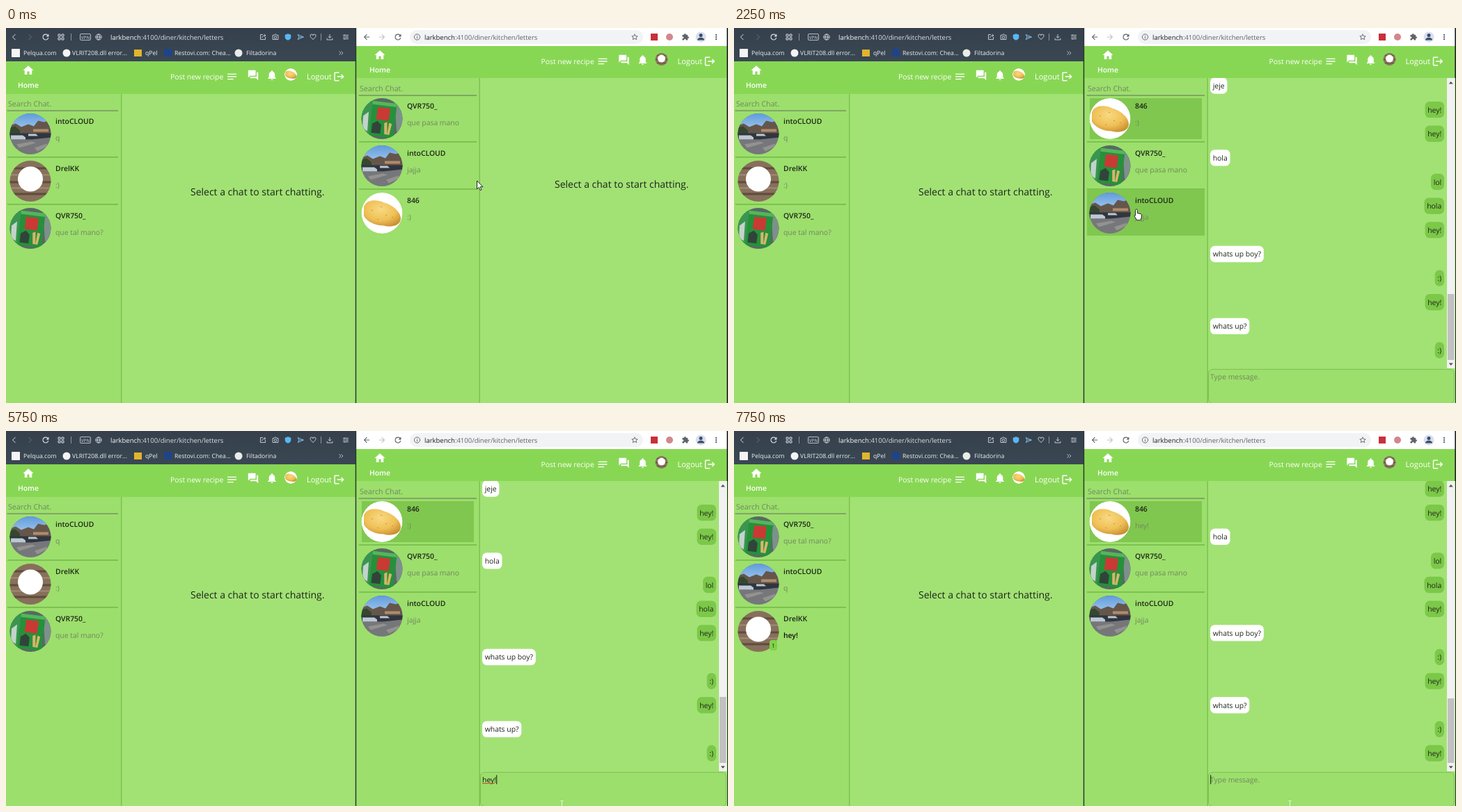
Write an HTML page that moves like this. It is 1037 px wide and 540 px high and loops after 8000 ms.

```html
<!DOCTYPE html>
<html lang="en">
<head>
<meta charset="utf-8">
<title>Recipe chat</title>
<style>
  html, body { margin: 0; width: 100%; height: 100%; overflow: hidden; background: #9cdf6b; }
  svg { display: block; width: 1037px; height: 540px; }
  text { font-family: "Open Sans", "Noto Sans", sans-serif; white-space: pre; text-rendering: geometricPrecision; }
</style>
</head>
<body>
<svg id="stage" viewBox="0 0 1037 540">
  <defs>
    <clipPath id="disc"><circle r="29.5"/></clipPath>
    <clipPath id="pane"><rect x="681" y="72" width="343" height="418"/></clipPath>
    <linearGradient id="bar" x2="0" y2="1">
      <stop stop-color="#35404c"/><stop offset="1" stop-color="#3a4753"/>
    </linearGradient>
    <linearGradient id="sky" x2="0" y2="1">
      <stop stop-color="#5f9bdc"/><stop offset="1" stop-color="#a9cdee"/>
    </linearGradient>
    <radialGradient id="skin" cx=".45" cy=".35" r=".7">
      <stop stop-color="#f8d982"/><stop offset=".6" stop-color="#efc056"/><stop offset="1" stop-color="#c98f33"/>
    </radialGradient>
    <g id="street" clip-path="url(#disc)">
      <rect x="-30" y="-30" width="60" height="60" fill="#75777b"/>
      <rect x="-30" y="-30" width="60" height="28" fill="url(#sky)"/>
      <path d="M-30-12l9-3 8 5 10-4 8 3 6-8 9 2 10-4v22h-60z" fill="#65564b"/>
      <path d="M-30-9l8-2 7 6v6h-15z" fill="#34482f"/>
      <path d="M4-7h22v4H4z" fill="#b08b6c"/>
      <path d="M-30-1h60v6l-28 3h-32z" fill="#30363f"/>
      <path d="M-28 2h17l4 3v3h-21zM-3 0h11l3 3H-3z" fill="#bcc8d2"/>
      <path d="M-20 15l22-4 6 2-24 7zM6 20l18-6v4l-14 7z" fill="#94928f"/>
    </g>
    <g id="snack" clip-path="url(#disc)">
      <rect x="-30" y="-30" width="60" height="60" fill="#566a63"/>
      <path d="M-30-30h18l-6 60h-12z" fill="#3a9550"/>
      <path d="M-27-4l8-6-2 28-7-4z" fill="#c3d3cb"/>
      <path d="M18-24l12 4v44l-9-6z" fill="#7e908a"/>
      <g transform="rotate(7)">
        <rect x="-16" y="-24" width="35" height="50" fill="#25913a"/>
        <rect x="-16" y="-24" width="35" height="5" fill="#57b45c"/>
        <rect x="-8" y="-16" width="18" height="18" fill="#c93a35"/>
        <path d="M-13 9l7-5 6 5v13h-13z" fill="#31443a"/>
        <path d="M4 6l4-2 2 18H6zM11 5l4 1-2 16h-3z" fill="#d8b56b"/>
      </g>
    </g>
    <g id="wood" clip-path="url(#disc)">
      <rect x="-30" y="-30" width="60" height="60" fill="#87705b"/>
      <path d="M-30-20h60v3h-60zM-30 0h60v3h-60zM-30 17h60v3h-60z" fill="#5f4c3c"/>
      <path d="M-30-10h60v2h-60zM-30 9h60v2h-60z" fill="#a38a72"/>
      <circle cy="-3" r="18" fill="#fff"/>
    </g>
    <g id="potato" clip-path="url(#disc)">
      <circle r="29.5" fill="#fff"/>
      <path d="M-26-9C-22-20-8-20 3-15C15-12 27-2 27 8C26 19 13 21 2 18C-10 18-22 12-26 4z" fill="url(#skin)"/>
      <path d="M-15-4h2M-2-9h2M5 3h2M14 6h2M-7 9h2" stroke="#c79338" stroke-width="1.2"/>
    </g>
  </defs>
  <g id="fixed"></g>
  <g id="live"></g>
</svg>
<script>
const LOOP = 8000;
const GREEN = { head: '#88d754', side: '#9cdf6c', main: '#a2e275', line: '#7cc250', deep: '#80c74f', mine: '#7cc849' };
const GREY = '#71875f', INK = '#1d2418';
const BODY = 10.4;

const ICONS = {
  home: 'M10 20v-6h4v6h5v-8h3L12 3 2 12h3v8z',
  forum: 'M21 6h-2v9H6v2c0 .55.45 1 1 1h11l4 4V7c0-.55-.45-1-1-1zm-4 6V3c0-.55-.45-1-1-1H3c-.55 0-1 .45-1 1v14l4-4h10c.55 0 1-.45 1-1z',
  bell: 'M12 22c1.1 0 2-.9 2-2h-4c0 1.1.89 2 2 2zm6-6v-5c0-3.07-1.64-5.64-4.5-6.32V4c0-.83-.67-1.5-1.5-1.5s-1.5.67-1.5 1.5v.68C7.63 5.36 6 7.92 6 11v5l-2 2v1h16v-1z',
  exit: 'M17 7l-1.41 1.41L18.17 11H8v2h10.17l-2.58 2.58L17 17l5-5zM4 5h8V3H4c-1.1 0-2 .9-2 2v14c0 1.1.9 2 2 2h8v-2H4z',
  notes: 'M3 18h12v-2H3zM3 6v2h18V6zm0 7h18v-2H3z',
  reload: 'M17.65 6.35C16.2 4.9 14.2 4 12 4a8 8 0 1 0 7.73 10h-2.08A6 6 0 1 1 16.2 7.8L13 11h7V4z',
  back: 'M20 11H7.83l5.59-5.59L12 4l-8 8 8 8 1.41-1.41L7.83 13H20z',
  puzzle: 'M20.5 11H19V7c0-1.1-.9-2-2-2h-4V3.5a2.5 2.5 0 0 0-5 0V5H4c-1.1 0-2 .9-2 2v3.8h1.5a2.7 2.7 0 0 1 0 5.4H2V20c0 1.1.9 2 2 2h3.8v-1.5a2.7 2.7 0 0 1 5.4 0V22H17c1.1 0 2-.9 2-2v-4h1.5a2.5 2.5 0 0 0 0-5z',
  shield: 'M12 2l9 3v7c0 5-4 8.500-9 10-5-1.500-9-5-9-10V5z',
  dots: 'M10 4h4v4h-4zM10 10h4v4h-4zM10 16h4v4h-4z'
};
const OUTLINES = {
  chevron: 'M15 4l-8 8 8 8',
  grid: 'M4 4h6v6H4zM14 4h6v6h-6zM4 14h6v6H4zM14 14h6v6h-6z',
  globe: 'M21 12a9 9 0 1 1-18 0 9 9 0 0 1 18 0zM3 12h18M12 3c-5 5-5 13 0 18 5-5 5-13 0-18',
  edit: 'M12 4H4v16h16v-8M9 15c1-6 4-8 11-8M16 3l5 4-5 4',
  camera: 'M3 6h5l2-3h4l2 3h5v14H3zM16 13a4 4 0 1 1-8 0 4 4 0 0 1 8 0z',
  send: 'M3 4l19 8-19 8 4-8zM7 12h14',
  heart: 'M12 20C5 14 3 11 3 8a4.5 4.5 0 0 1 9-1 4.5 4.5 0 0 1 9 1c0 3-2 6-9 12z',
  load: 'M12 3v12M7 10l5 5 5-5M3 16v5h18v-5',
  sliders: 'M3 6h18M3 12h18M3 18h18M8 4v4M16 10v4M9 16v4',
  info: 'M21 12a9 9 0 1 1-18 0 9 9 0 0 1 18 0zM12 11v6M12 7v2',
  star: 'M12 3l2.7 6 6.300.6-4.800 4.200 1.500 6.200-5.700-3.400-5.700 3.400 1.500-6.200L3 9.600l6.300-.6z',
  more: 'M5 5l7 7-7 7M13 5l7 7-7 7'
};
const CURSORS = {
  arrow: ['M.5.5v12l2.800-2.600 1.900 4.300 1.900-.8-1.900-4.200h3.800z', '#fff', '#111'],
  hand: ['M4 .5c1 0 1.400.7 1.400 1.500v4.200l4.600.9c1.200.3 1.700 1 1.600 2.200l-.6 3.700-1.300 3.200H4.700L1.100 10.500c-.6-.9.400-1.800 1.500-1V2C2.600 1.100 3.100.5 4 .5z', '#fff', '#111'],
  beam: ['M-2 .5h1.500l.5.5.5-.5H2M0 1v9', 'none', '#f4fbea']
};

const pen = document.createElement('canvas').getContext('2d');
pen.font = `${BODY}px "Open Sans", "Noto Sans", sans-serif`;
const widthOf = s => pen.measureText(s).width;

const rect = (x, y, w, h, fill, extra = '') =>
  `<rect x="${x}" y="${y}" width="${w}" height="${h}" fill="${fill}" ${extra}/>`;
const circle = (x, y, r, fill) => `<circle cx="${x}" cy="${y}" r="${r}" fill="${fill}"/>`;
const text = (x, y, s, fill = INK, size = BODY, weight = 400, anchor = 'start') =>
  `<text x="${x}" y="${y}" fill="${fill}" font-size="${size}" font-weight="${weight}" text-anchor="${anchor}">${s}</text>`;
const place = (x, y, k, inner) => `<g transform="translate(${x} ${y}) scale(${k})">${inner}</g>`;
// Icons sit on a 24-unit grid and are placed by their centre.
const icon = (name, x, y, k, fill = '#fff') =>
  place(x - 12 * k, y - 12 * k, k, `<path d="${ICONS[name]}" fill="${fill}"/>`);
const outline = (name, x, y, k, color, weight = 2) =>
  place(x - 12 * k, y - 12 * k, k, `<path d="${OUTLINES[name]}" fill="none" stroke="${color}" stroke-width="${weight}"/>`);
const avatar = (id, x, y, r = 29.5) => place(x, y, r / 29.5, `<use href="#${id}"/>`);

const HOST = 'larkbench', PATH = ':4100/diner/kitchen/letters';
const address = (x, hostColor, pathColor) =>
  text(x, 17, `${HOST}<tspan fill="${pathColor}">${PATH}</tspan>`, hostColor, 9.5);

function darkBrowser() {
  const c = '#d5dbe0';
  const tools = [['edit', 369], ['camera', 387], ['send', 423], ['heart', 441], ['load', 465], ['sliders', 488]];
  const marks = [[25, 'Pelqua.com'], [95, 'VLRIT208.dll error...'], [200, 'qPel'], [242, 'Restovi.com: Chea...'], [345, 'Filtadorina']];
  return rect(0, 0, 502, 48, 'url(#bar)')
    + outline('chevron', 12, 13, .5, c) + `<g transform="rotate(180 34 13)">${outline('chevron', 34, 13, .5, '#65717c')}</g>`
    + icon('reload', 57, 13, .56, c) + outline('grid', 79, 13, .5, c)
    + rect(93, 8, 1, 10, '#8b959d') + rect(452, 8, 1, 10, '#8b959d')
    + rect(106.5, 8.5, 15, 9, 'none', `rx="1.500" stroke="${c}" stroke-width=".8"`) + text(114, 15.5, 'VPN', c, 6.3, 400, 'middle')
    + outline('globe', 133, 13, .46, c) + address(150, '#f5f7f8', '#d9dee2')
    + tools.map(([n, x]) => outline(n, x, 13, .44, n === 'send' ? '#8cc8f0' : c)).join('')
    + icon('shield', 405, 13, .48, '#58b7f3')
    + rect(8, 30, 12, 12, '#f4f4f4') + circle(87, 36, 5.5, '#f4f4f4') + rect(184, 31, 11, 10, '#e2b52c')
    + rect(227, 30, 11, 11, '#1e4488') + circle(334, 36, 5.5, '#e9ece8')
    + marks.map(([x, s]) => text(x, 39, s, '#eef1f3', 8.7)).join('')
    + outline('more', 481, 36, .38, c);
}

function lightBrowser() {
  const c = '#5f6368';
  return rect(503, 0, 533, 26, '#fff') + rect(580, 3, 335, 20, '#f1f3f4', 'rx="10"')
    + icon('back', 518, 13, .52, c) + `<g transform="rotate(180 540 13)">${icon('back', 540, 13, .52, '#bfc2c5')}</g>`
    + icon('reload', 563, 13, .56, c) + outline('info', 590.5, 13, .46, c)
    + address(601, '#202124', c) + outline('star', 903, 13, .46, c)
    + rect(926, 8, 10, 10, '#c8303a') + circle(953, 13, 5, '#d4868c')
    + icon('puzzle', 976, 13, .46, c)
    + circle(998, 13, 7.5, '#d9e0ec') + circle(998, 10.5, 2.5, '#3c4d70') + '<path d="M993 17.500c0-5 10-5 10 0z" fill="#3c4d70"/>'
    + icon('dots', 1020, 13, .5, c);
}

// dx moves the home link, ex the group at the right end.
function header(dx, ex, y, face) {
  return icon('home', 32 + dx, y + 13, .75) + text(32 + dx, y + 38, 'Home', '#fff', BODY, 600, 'middle')
    + text(236 + ex, y + 26, 'Post new recipe', '#fff') + icon('notes', 324.5 + ex, y + 22, .72)
    + icon('forum', 355 + ex, y + 20, .72) + icon('bell', 382 + ex, y + 20, .72)
    + avatar(face, 409 + ex, y + 19, 9)
    + text(432 + ex, y + 26, 'Logout', '#fff', 11) + icon('exit', 478.5 + ex, y + 22, .72);
}

function fixedParts() {
  return rect(0, 48, 502, 492, GREEN.side) + rect(166, 95, 336, 445, GREEN.main)
    + rect(0, 48, 502, 47, GREEN.head) + rect(165, 95, 1.5, 445, GREEN.line)
    + darkBrowser() + header(0, 0, 48, 'potato')
    + text(265, 241, 'Select a chat to start chatting.', INK, 14)
    + rect(503, 26, 533, 514, GREEN.side) + rect(681, 72, 355, 468, GREEN.main)
    + rect(503, 26, 533, 46, GREEN.head) + rect(679.5, 72, 1.5, 468, GREEN.line)
    + lightBrowser() + header(505, 532.5, 26, 'wood')
    + rect(501.7, 0, 1.5, 540, '#2c3830') + rect(1035.3, 0, 1.7, 540, '#23282a');
}

const street = msg => ({ face: 'street', name: 'intoCLOUD', msg });
const snack = msg => ({ face: 'snack', name: 'QVR750_', msg });
const wood = (msg, unread) => ({ face: 'wood', name: 'DrelKK', msg, unread });
const potato = msg => ({ face: 'potato', name: '846', msg });

function chatList(x, y, w, items, { active, hover } = {}) {
  let out = text(x + 1, y - 6, 'Search Chat.', GREY, 10.7) + rect(x - .5, y - .5, w + .5, 1.2, '#6f8263');
  if (hover) out += rect(x, y + 135, w, 67, GREEN.deep);
  if (active) out += rect(x + 4, y + 4, w - 8, 59, GREEN.deep);
  items.forEach(({ face, name, msg, unread }, i) => {
    const top = y + 68 * i;
    out += avatar(face, x + 33, top + 33.5) + text(x + 69, top + 19, name, INK, BODY, 600)
      + text(x + 69, top + 43, msg, unread ? '#111' : GREY, BODY, unread ? 600 : 400);
    if (unread) out += rect(x + 49, top + 46, 11, 15, '#7fd24a', 'rx="4"') + text(x + 54.5, top + 57, '1', INK, 8, 400, 'middle');
    if (i < items.length - 1) out += rect(x, top + 66, w, 2, GREEN.line);
  });
  return out;
}

// A leading ">" marks the user's own messages.
const LOG = ['jeje', '>hey!', '>hey!', 'hola', '>lol', '>hola', '>hey!', 'whats up boy?', '>:)', '>hey!', 'whats up?', '>:)', '>hey!'];

function bubble(line, i) {
  const mine = line[0] === '>', s = mine ? line.slice(1) : line;
  const w = widthOf(s) + 7.5, x = mine ? 1020 - w : 684, y = 83 + 34.64 * i;
  return rect(x, y - 11.7, w, 23.4, mine ? GREEN.mine : '#fff', 'rx="6.500"') + text(x + 3.7, y + 4, s);
}

function chatPane({ sent, typed, caret, squiggle }) {
  const end = 684 + widthOf(typed), thumb = sent ? 385 : 383;
  let out = rect(681, 72, 355, 468, GREEN.main)
    + `<g clip-path="url(#pane)">${LOG.slice(sent, sent + 12).map(bubble).join('')}</g>`
    + rect(1024, 72, 11.3, 418, '#f1f1f1') + rect(1025, thumb, 9.3, 478 - thumb, '#c1c1c1')
    + '<path d="M1026.700 80.500l3-3.500 3 3.500zM1026.700 482.500l3 3.500 3-3.500z" fill="#505050"/>'
    + rect(681.5, 491.5, 353, 49, GREEN.side, `rx="6" stroke="#6fb044" stroke-dasharray="1.500 .7"`)
    + (typed ? text(684, 506, typed, '#111') : text(684, 506, 'Type message.', GREY));
  if (squiggle) out += `<path d="M684 508${'l1-1 1 1'.repeat(9)}" fill="none" stroke="#d8342c" stroke-width=".9"/>`;
  if (caret) out += rect(end + .2, 495.5, 1, 13, '#111');
  return out;
}

function cursor([kind, x, y]) {
  const [d, fill, stroke] = CURSORS[kind];
  return place(x, y, 1, `<path d="${d}" fill="${fill}" stroke="${stroke}" stroke-width=".9" stroke-linejoin="round"/>`);
}

const STEPS = [
  [0, { cur: ['arrow', 676, 219.5], open: 0, hover: 0, sent: 0, typed: '', caret: 0, squiggle: 0 }],
  [250, { cur: ['arrow', 680, 268] }],
  [500, { cur: ['arrow', 688, 295] }],
  [750, { cur: ['arrow', 688, 296] }],
  [1000, { cur: ['arrow', 686, 296] }],
  [1250, { cur: ['hand', 587, 262], hover: 1 }],
  [1500, { cur: ['hand', 574, 260.5] }],
  [2250, { open: 1 }],
  [2500, { cur: ['hand', 584, 265] }],
  [2750, { cur: ['beam', 798.5, 530], hover: 0 }],
  [3250, { cur: ['beam', 798.5, 532] }],
  [3500, { caret: 1 }],
  [4000, { caret: 0 }],
  [4250, { typed: 'hey', caret: 1 }],
  [5000, { caret: 0 }],
  [5500, { caret: 1, squiggle: 1 }],
  [5750, { typed: 'hey!' }],
  [6250, { sent: 1, typed: '', caret: 0, squiggle: 0 }],
  [6750, { caret: 1 }],
  [7250, { caret: 0 }],
  [7750, { caret: 1 }]
];

function scene(s) {
  const left = s.sent
    ? [snack('que tal mano?'), street('q'), wood('hey!', true)]
    : [street('q'), wood(':)'), snack('que tal mano?')];
  const rest = [snack('que pasa mano'), street('jajja')];
  const mine = potato(s.sent ? 'hey!' : ':)');
  const right = s.open ? [mine, ...rest] : [...rest, mine];
  return chatList(2, 119, 159, left)
    + chatList(507, 97, 169, right, { active: s.open, hover: s.hover })
    + (s.open ? chatPane(s) : text(788, 230, 'Select a chat to start chatting.', INK, 14))
    + cursor(s.cur);
}

document.getElementById('fixed').innerHTML = fixedParts();
const live = document.getElementById('live');
const start = performance.now();
let shown = 0;

function tick() {
  const t = (performance.now() - start) % LOOP;
  const past = STEPS.filter(([at]) => at <= t);
  if (past.length !== shown) {
    shown = past.length;
    live.innerHTML = scene(Object.assign({}, ...past.map(step => step[1])));
  }
  requestAnimationFrame(tick);
}
tick();
</script>
</body>
</html>
```
